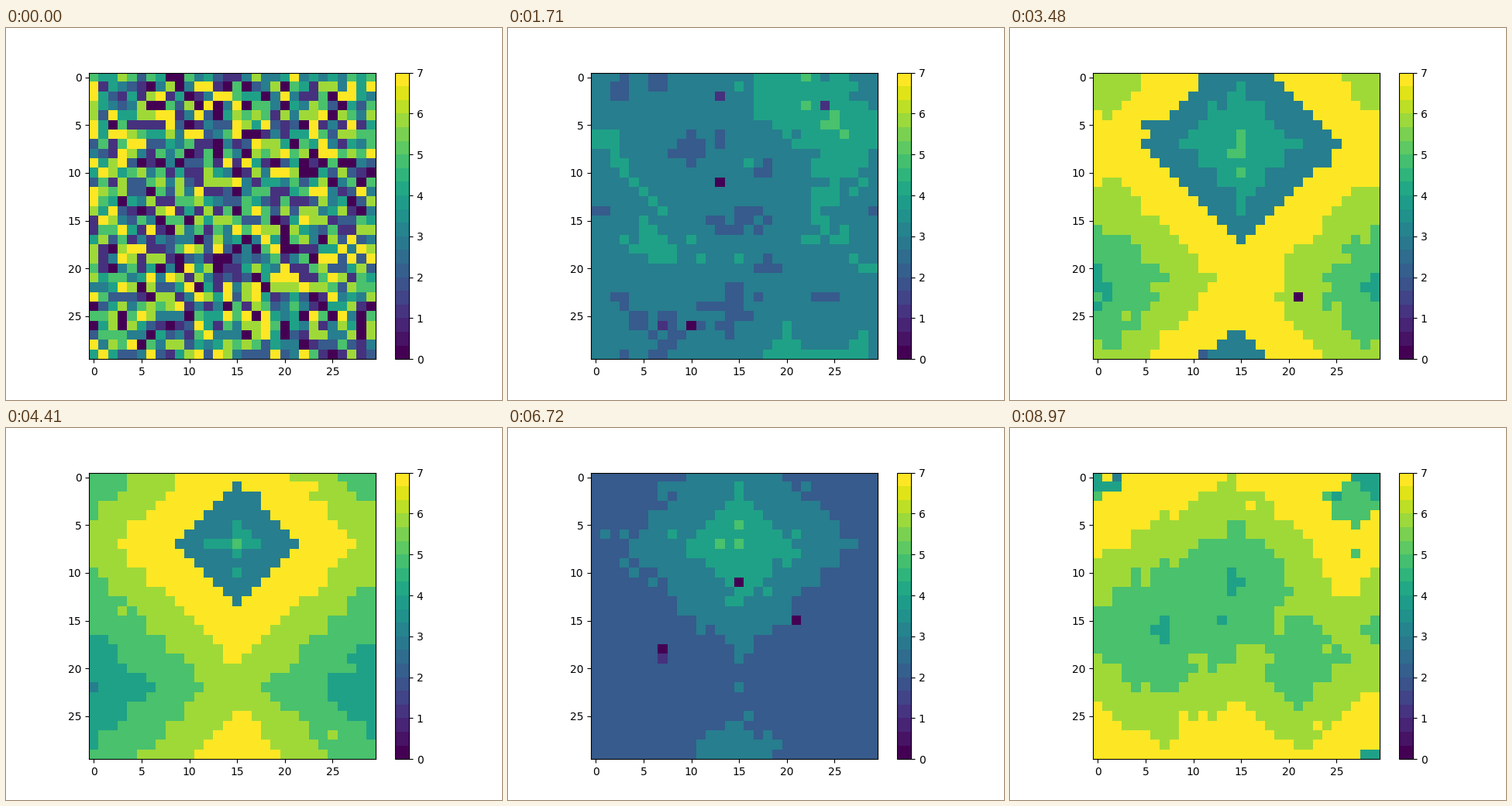
Recreate the animation shown at these times as a matplotlib script. Size 640x480 px, loop 9 s.

```python
import numpy as np
import matplotlib.pyplot as plt
from matplotlib.animation import FuncAnimation
from matplotlib.cm import ScalarMappable
from matplotlib.colors import Normalize

N, FRAMES, STEP = 30, 300, 30
TOP = 7         # level of a cell that has just fired
DECAY = 5.5     # frames per level
REST = 15       # frames before a cell can fire again
REST_AGE = 31   # ageing stops here, at level 2

rng = np.random.default_rng(7)


def scatter(start, count=16):
    """Many pacemakers going off almost together."""
    return [(start + int(rng.integers(3)), *map(int, rng.integers(0, N, 2)))
            for _ in range(count)]


# Pacemakers as (time, x, y): a steady one on the left, then others
sources = [(t, 0, 22) for t in range(43, 190, 27)]
sources += [(226, 12, 18), (238, 28, 4), (255, 12, 18)]
sources += scatter(26) + scatter(281)


def near_front(age):
    """True where one of the four neighbours, wrapping round, fired lately."""
    hot = (age >= 1) & (age <= 4)
    return np.any([np.roll(hot, s, axis) for axis in (0, 1) for s in (1, -1)], axis=0)


def levels(age):
    return np.clip(TOP - age // DECAY, 0, TOP)


def simulate():
    """Cells fade level by level until a passing front fires them again."""
    age = (TOP - rng.integers(0, TOP + 1, (N, N))) * DECAY
    states = [levels(age)]
    for t in range(1, FRAMES):
        age += (age < REST_AGE) & (rng.random((N, N)) < 0.97)
        fire = near_front(age) & (rng.random((N, N)) < 0.92)
        for start, x, y in sources:
            fire[y, x] |= start == t
        age[fire & (age >= REST)] = 0
        if t > 20 and rng.random() < 0.12:      # a stray cell drops out
            x, y = rng.integers(0, N, 2)
            age[y, x] = DECAY * rng.integers(6, 8)
        states.append(levels(age))
    return states


states = simulate()

fig, ax = plt.subplots(figsize=(6.4, 4.8), dpi=100)
norm = Normalize(0, TOP)
im = ax.imshow(states[0], cmap="viridis", norm=norm, interpolation="nearest")
fig.colorbar(ScalarMappable(norm, plt.get_cmap("viridis", 21)), ax=ax)


def update(t):
    im.set_data(states[t])
    return [im]


anim = FuncAnimation(fig, update, frames=FRAMES, interval=STEP, repeat=True,
                     repeat_delay=0)
plt.show()
```
